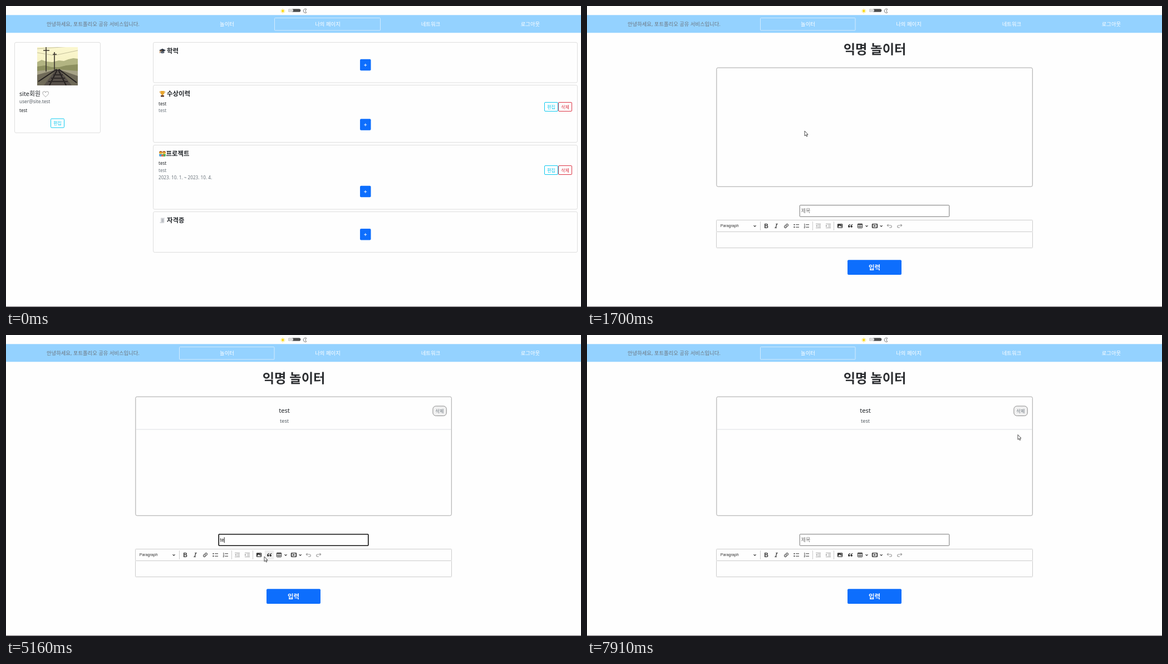
These frames come from a looping animation (1033x542 px, 8 s). An HTML page:

```html
<!DOCTYPE html>
<html lang="ko">
<head>
<meta charset="utf-8">
<title>Portfolio board</title>
<style>
html, body { margin: 0; width: 100%; height: 100%; overflow: hidden; background: #fefefe; }
svg { display: block; }
#stage { width: 100vw; height: 100vh; }
text { font-family: "Noto Sans", "Noto Sans CJK KR", sans-serif; white-space: pre; }
.ui { font-family: "Liberation Sans", Arial, sans-serif; }
</style>
</head>
<body>
<svg id="stage" viewBox="0 0 1033 542"></svg>
<script>
const INK = '#212529', GRAY = '#6c757d', BLUE = '#0d6efd', CYAN = '#0dcaf0', RED = '#dc3545';
const LOOP = 8000;
const stage = document.getElementById('stage');

// ---- markup helpers
const text = (x, y, size, str, fill = INK, extra = '') =>
  `<text x="${x}" y="${y}" font-size="${size}" fill="${fill}" ${extra}>${str}</text>`;
const mid = (x, y, size, str, fill, extra = '') =>
  text(x, y, size, str, fill, 'text-anchor="middle" ' + extra);
const box = (x, y, x2, y2, fill, stroke = 'none', rx = 0, extra = '') =>
  `<rect x="${x}" y="${y}" width="${x2 - x}" height="${y2 - y}" rx="${rx}" fill="${fill}" stroke="${stroke}" ${extra}/>`;
const path = (d, fill = 'none', stroke = 'none', w = 1) =>
  `<path d="${d}" fill="${fill}" stroke="${stroke}" stroke-width="${w}"/>`;
const dot = (x, y, r, fill) => `<circle cx="${x}" cy="${y}" r="${r}" fill="${fill}"/>`;
const at = (x, y, body, extra = '') => `<g transform="translate(${x} ${y})" ${extra}>${body}</g>`;
const group = (id, body) => `<g id="${id}">${body}</g>`;
const BOLD = 'font-weight="700"';

// ---- header
const header = () => {
  let rays = '';
  for (let a = 0; a < 360; a += 45)
    rays += `<path d="M0 -3v-1.3" stroke="#f3d33c" stroke-width=".9" transform="rotate(${a})"/>`;
  const links = [['놀이터', 397], ['나의 페이지', 578], ['네트워크', 763], ['로그아웃', 942]];
  return at(497.3, 9, rays + dot(0, 0, 2.4, '#fbdc1c')) +
    box(507, 5.2, 529.3, 10.8, '#4c4c4c', 'none', 2.8) +
    box(507, 5, 516, 11, '#dcdcdc', 'none', 3) +
    path('M539.8 5.6a3.7 3.7 0 1 0 0 6.4a3.9 3.9 0 0 1 0 -6.4z', '#fff', '#555', .8) +
    box(0, 16.3, 1033, 48.3, '#94d2ff') +
    text(73, 36.2, 9.34, '안녕하세요, 포트폴리오 공유 서비스입니다.', GRAY) +
    links.map(([s, x]) => mid(x, 36.2, 9.4, s, '#fff')).join('') +
    box(482.5, 21.5, 672.5, 44, 'none', '#d3ebfd', 1, 'id="tab"');
};

// ---- profile page
const smallBtn = (x, y, label, color) =>
  box(x, y, x + 24, y + 16, 'none', color, 1.5) + mid(x + 12, y + 11, 8, label, color);

const photo = () =>
  `<svg x="56" y="74" width="73" height="69">` +
  `<defs><linearGradient id="sky" x2="0" y2="1"><stop stop-color="#fbf7cf"/><stop offset="1" stop-color="#eeeab4"/></linearGradient></defs>` +
  box(0, 0, 73, 69, 'url(#sky)') +
  path('M0 27l8-4 9 3 10 1 12-3 9 1 8-3 9-2 8 1v24H0z', '#b2b482') +
  path('M0 35l14-2 12 3 14 0 12-3 21-2v20H0z', '#8d9060') +
  path('M0 43l34-3 39 3v26H0z', '#a6a286') +
  path('M0 50l32-9 9 0 32 11v17H0z', '#6f6a58') +
  path('M34 40h6L62 69H12z', '#57504a') +
  path('M35 40L2 62M39 40L71 64M36 41L22 69M38 41L52 69', 'none', '#24201f', 2) +
  path('M29 50h17M25 56h25M20 62h35', 'none', '#2f2a28', 1.8) +
  path('M16 0v44M31 9v32M11 6h11M28 13h7', 'none', '#38332c', 1.6) +
  path('M0 3L73 -2M0 10L31 15L73 6', 'none', '#8a8668', .5) +
  `</svg>`;

const icons = {
  cap: path('M-6 -1.2L0 -4.2L6 -1.2L0 2z', '#2c3440') + path('M-3.4 .8v2.4q3.4 2 6.8 0V.8L0 2.6z', '#454f5e') +
    path('M0 -1.2L-4.6 .4v3.4', 'none', '#b0702c', .9),
  cup: path('M-3 -5h6v3.4q0 3-3 3.6q-3-.6-3-3.6z', '#e9a52d') +
    path('M-3 -4h-1.7q0 3 2.2 3.4M3 -4h1.7q0 3-2.2 3.4', 'none', '#d28d1e', .9) +
    box(-.8, 1.5, .8, 3.4, '#c98419') + box(-3, 2.8, 3, 5.4, '#5d3a2a', 'none', .6),
  people: [[-3, '#4a9fdc'], [3, '#54ae57']].map(([x, c]) =>
    box(x - 2.8, 0, x + 2.8, 5, c, 'none', 1.4) + dot(x, -2, 2.8, '#f3bd3c') +
    path(`M${x - 2.8} -2a2.8 2.8 0 0 1 5.6 0q-2.8 -1.6 -5.6 0z`, '#a1562a')).join('') +
    box(-2, 1.5, 2, 5, '#e06a4a', 'none', 1),
  scroll: path('M-3 -4.5h7.4l-1 1.4v6.6q0 1.4-1.6 1.4h-5q-1.8 0-1.8-1.6h2z', '#d3d5d9') +
    path('M-1 -2h3M-1 0h3M-1 2h3', 'none', '#8d9299', .7)
};

const section = (y, y2, icon, title, mx, plus) =>
  box(264.5, y, 1026.5, y2, '#fefefe', '#dedede', 2.5) +
  at(281, y + 15.5, icons[icon]) +
  text(mx, y + 19, 11.4, title, INK, BOLD) +
  box(636, plus, 655.5, plus + 20.4, BLUE, 'none', 2) +
  path(`M643.2 ${plus + 10.6}h5M645.7 ${plus + 8.1}v5`, 'none', '#fff', .9);

const profile = () =>
  box(15.5, 65.5, 169.5, 228.3, '#fefefe', '#dedede', 2.5) + photo() +
  text(24, 162, 10.8, 'site회원') +
  path('M71.2 163.6C67 160 66 158.3 66 156.8a2.6 2.6 0 0 1 5.2 -.7a2.6 2.6 0 0 1 5.2 .7C76.400 158.300 75.400 160 71.200 163.600z', '#fff', '#8c8c8c', .8) +
  text(24, 175, 8.3, 'user@site.test', '#565d64') + text(24, 190.8, 8.1, 'test') +
  smallBtn(80.5, 203, '편집', CYAN) +
  section(65.5, 138, 'cap', '학력', 289, 95.8) +
  section(142.5, 245.5, 'cup', '수상이력', 289, 203.3) +
  section(250.5, 366, 'people', '프로젝트', 287.5, 323.8) +
  section(370.5, 443.5, 'scroll', '자격증', 289, 401) +
  [178.6, 286.2].map(y => text(274, y, 8.1, 'test') + text(274, y + 12.8, 8.1, 'test', GRAY)).join('') +
  text(274, 311.8, 8.2, '2023. 10. 1. ~ 2023. 10. 4.', GRAY) +
  [173.5, 287.5].map(y => smallBtn(967.5, y, '편집', CYAN) + smallBtn(992.5, y, '삭제', RED)).join('');

// ---- board page
const chevron = x => path(`M${x - 2} 395.200l2 2 2 -2`, 'none', '#333', 1.1);
const line = (x, x2, ...ys) => ys.map(y => `M${x} ${y}H${x2}`).join('');
const quote = 'M0 -3.2c-2.700 .5-4 2-4 4.300a1.800 1.800 0 1 0 1.800-1.800c0-.8.7-1.400 2.200-1.400z';
const turn = 'M-4 -1H1.8a2 2 0 0 1 0 4H-.5M-2 -3.200L-4.200 -1L-2 1.200';
const indent = line(-4.5, 4.5, -3.5, 3.5) + line(-.3, 4.5, -1.2, 1.2);

const tools = [
  [322, '<text class="ui" x="-3.7" y="3.7" font-size="10.500" font-weight="700" fill="#333">B</text>'],
  [340, path('M-.8 -3.500h3.600M-2.800 3.500h3.600M1 -3.500L-1 3.500', 'none', '#333', 1.2)],
  [358, `<g transform="rotate(-45)">${path('M0 -1.900h-2.200a1.900 1.900 0 0 0 0 3.800h1.700M0 1.900h2.200a1.900 1.900 0 0 0 0 -3.800h-1.700M-1.600 0h3.200', 'none', '#333', 1)}</g>`],
  [376, dot(-3.6, -2.2, 1.1, '#333') + dot(-3.6, 2.2, 1.1, '#333') + path(line(-.8, 5, -2.2, 2.2), 'none', '#333', 1.1)],
  [394, text(-4.6, -.4, 4.6, '1', '#333', BOLD) + text(-4.6, 4.4, 4.6, '2', '#333', BOLD) + path(line(-.8, 5, -2.2, 2.2), 'none', '#333', 1.1)],
  [415.5, path(indent, 'none', '#999', .9) + path('M-1.700 -1.800v3.600L-4.500 0z', '#999')],
  [433.5, path(indent, 'none', '#999', .9) + path('M-4.500 -1.800v3.600L-1.700 0z', '#999')],
  [454.5, box(-4.6, -3.7, 4.6, 3.7, '#333', 'none', 1) + path('M-3.500 2.400L-1 -1l2 2 1-1 1.800 2.400z', '#fff') + dot(2.4, -1.6, .8, '#fff')],
  [473, path(quote, '#333') + at(4.4, 0, path(quote, '#333'))],
  [490.5, box(-4.2, -3.7, 4.2, 3.7, 'none', '#333', .8) + path('M-4 -2.800h8', 'none', '#333', 1.6) + path('M-4 .9h8M-1.400 -2v6M1.400 -2v6', 'none', '#333', .8)],
  [517, box(-4.6, -3.4, 4.6, 3.4, 'none', '#333', .8, 'stroke-width="1.200"') + path('M-1.400 -2v4L2 0z', '#333') + path('M-3.200 -3v6M3.200 -3v6', 'none', '#333', .7)],
  [543.5, `<g id="undo">${path(turn, 'none', 'currentColor', 1.1)}</g>`],
  [561.5, `<g transform="scale(-1 1)">${path(turn, 'none', '#999', 1.1)}</g>`]
];

const post = i => at(0, i * 53.5,
  mid(500, 140, 11.2, '', INK, `id="pt${i}"`) +
  mid(500, 157.6, 9.1, '', '#545b62', `id="pb${i}"`) +
  box(766.9, 128, 791.3, 145.5, '#f1f1f1', '#8b8b8b', 5.5, `id="del${i}"`) +
  mid(779, 139.8, 8.1, '삭제', GRAY) +
  path('M233 170H800', 'none', '#dcdfe2'), `id="post${i}"`);

const board = () =>
  mid(517, 86.3, 23.2, '익명 놀이터', '#2b2d30', BOLD) +
  box(232.8, 111.2, 800.3, 325.2, '#fefefe', '#a6a6a6', 2.5) +
  post(0) + post(1) +
  box(382.2, 358.7, 650.8, 379.3, '#fff', '#767676', 1, 'id="input"') +
  text(384.5, 372.3, 9.2, '제목', '#757575', 'id="hint"') +
  text(384.2, 372.2, 8.1, '', '#111', 'id="title"') +
  box(232.5, 385.5, 800.5, 406.5, '#fefefe', '#cbcbcb', 1) +
  box(232.5, 406.5, 800.5, 435.5, '#fefefe', '#cbcbcb', 1, 'id="editor"') +
  text(239.7, 398.2, 7.06, 'Paragraph', '#333', 'class="ui"') + chevron(301.5) +
  path('M311.500 388v16M405.500 388v16M443.500 388v16', 'none', '#ccc') +
  box(0, 387.7, 16.4, 404.2, '#efefef', 'none', 1, 'id="hover"') +
  tools.map(([x, body]) => at(x, 396, body)).join('') + chevron(502.5) + chevron(528.7) +
  text(238, 424.3, 8.1, '', '#333', 'id="body"') +
  box(0, 0, .9, 10, '#000', 'none', 0, 'id="caret"') +
  box(468, 457.2, 565, 484, BLUE, 'none', 2, 'id="send"') +
  mid(516.5, 474.6, 11.4, '입력', '#fff', BOLD);

const cursors = {
  arrow: path('M0 0V8.800L2 7L3.400 10L4.900 9.300L3.500 6.400H6z', '#fff', '#222', .8),
  hand: path('M-.9 5.500V.9a.9 .9 0 0 1 1.800 0V4l3.500 .8q1 .4 .8 1.600L4.600 9.500L3.800 12H-.4L-3.200 8.200q-.8-1.300 .3-1.600q1 0 2 1.400z', '#fff', '#222', .8),
  beam: path('M-1.800 -4.500q1.800 0 1.800 1v7q0 1-1.800 1M1.800 -4.500q-1.800 0-1.800 1M0 3.500q0 1 1.800 1', 'none', '#222', .8)
};

stage.innerHTML =
  group('site', header() + group('profile', profile()) + group('board', board())) +
  group('loading', text(0, 10, 8.1, 'loading...')) +
  group('status', path('M0 530H341.500q1.700 0 1.700 1.700V541.500H0z', '#58b8c1') +
    text(2.5, 538.3, 6.65, 'picsum.photos의 응답을 기다리는 중...', '#1f3437')) +
  box(0, 541, 1033, 542, '#6f6b70') +
  Object.keys(cursors).map(k => group(k, cursors[k])).join('');

// ---- timeline
// start, end, step count of each burst of changes
const bursts = [[300, 1000, 8], [1200, 2000, 9], [2100, 2890, 9], [2990, 3590, 7], [3790, 4570, 9],
  [4670, 5450, 9], [5550, 6330, 9], [6530, 7330, 9], [7430, 7910, 6]];

// time, x, y of the pointer
const trail = [[300, 574, 30], [600, 490, 11], [900, 391, 36], [1000, 389, 37], [1400, 389, 37],
  [1700, 391, 225], [2000, 430, 367], [2100, 432, 369], [2300, 453, 404], [2790, 453, 404],
  [2990, 440, 420], [3400, 440, 420], [3590, 521, 467.5], [4080, 521, 467.5], [4570, 462, 367],
  [4670, 463, 368], [4870, 464, 399], [5350, 464, 399], [5550, 452, 420], [6100, 452, 420],
  [6330, 523, 466], [6730, 523, 466], [7330, 779, 137], [7620, 779, 137], [7910, 774, 179.5]];

const snap = t => {
  let s = 0;
  for (const [a, b, n] of bursts) {
    if (t < a) break;
    const d = (b - a) / (n - 1);
    s = Math.min(b, a + Math.floor((t - a) / d + 1e-6) * d);
  }
  return s;
};
const pointer = t => {
  const i = trail.findIndex(k => k[0] > t);
  if (i < 0) return trail[trail.length - 1].slice(1);
  const [t0, x0, y0] = trail[Math.max(0, i - 1)], [t1, x1, y1] = trail[i];
  const p = t1 > t0 ? (t - t0) / (t1 - t0) : 0;
  return [x0 + (x1 - x0) * p, y0 + (y1 - y0) * p];
};
const typed = (word, start, step, t) => word.slice(0, Math.max(0, Math.floor((t - start) / step) + 1));
const within = (t, a, b) => t >= a && t < b;

const el = {};
stage.querySelectorAll('[id]').forEach(n => { el[n.id] = n; });
const show = (id, on) => { el[id].style.display = on ? '' : 'none'; };
const set = (id, attrs) => { for (const k in attrs) el[id].setAttribute(k, attrs[k]); };
const say = (id, s) => { if (el[id].textContent !== s) el[id].textContent = s; };

function draw(now) {
  const t = snap(now);
  const [x, y] = pointer(t);
  const loading = within(t, 1200, 1400), onBoard = t >= 1400;
  show('site', !loading);
  show('loading', loading);
  show('profile', !onBoard);
  show('board', onBoard);
  show('status', within(t, 300, 1400));
  set('tab', onBoard ? { x: 311.5, width: 170.5 } : { x: 482.5, width: 190 });

  // form
  let title = '', body = '';
  if (t < 3970) {
    title = typed('test', 2300, 130, t);
    body = typed('test', 3080, 95, t);
  } else if (t < 6730) {
    title = typed('testt', 5060, 95, t);
    body = typed('teste', 5640, 95, t);
  }
  const inTitle = within(t, 2100, 2990) || within(t, 4670, 5550);
  const inBody = within(t, 2990, 3790) || within(t, 5550, 6630);
  say('title', title);
  say('body', body);
  show('hint', !title);
  set('input', { stroke: inTitle ? '#101010' : '#767676', 'stroke-width': inTitle ? 1.6 : 1 });
  set('editor', { stroke: inBody ? '#2977ff' : '#cbcbcb' });
  set('undo', { color: body ? '#333' : '#999' });
  show('caret', onBoard && (inTitle || inBody));
  if (onBoard && (inTitle || inBody)) {
    const id = inTitle ? 'title' : 'body', field = el[id];
    const w = field.textContent ? field.getComputedTextLength() : 0;
    set('caret', { x: +field.getAttribute('x') + w, y: +field.getAttribute('y') - 8 });
  }

  // posts, newest first
  const posts = [];
  if (within(t, 6730, 7620)) posts.push(['testt', 'teste']);
  if (t >= 3970) posts.push(['test', 'test']);
  for (const i of [0, 1]) {
    show('post' + i, posts[i]);
    if (posts[i]) { say('pt' + i, posts[i][0]); say('pb' + i, posts[i][1]); }
  }

  // pointer and hover
  const over = (a, b, c, d) => x >= a && x <= c && y >= b && y <= d;
  const onSend = onBoard && over(468, 457, 565, 484);
  const onDel = posts.length > 0 && over(767, 128, 791, 145);
  const onText = onBoard && (over(382, 359, 651, 379) || over(233, 407, 800, 435));
  const onLink = !loading && over(311, 17, 1033, 48);
  const tool = onBoard && y > 387 && y < 405 && tools.find(k => x >= k[0] - 9.2 && x < k[0] + 8.8);
  set('send', { fill: onSend ? '#0b5ed7' : BLUE });
  set('del0', { fill: onDel ? '#e3e3e3' : '#f1f1f1' });
  show('hover', tool);
  if (tool) set('hover', { x: tool[0] - 8.2 });
  const kind = onSend || onDel || onLink ? 'hand' : onText ? 'beam' : 'arrow';
  for (const k in cursors) show(k, t >= 300 && k === kind);
  set(kind, { transform: `translate(${x} ${y})` });
}

const begin = performance.now();
function tick() {
  draw((performance.now() - begin) % LOOP);
  requestAnimationFrame(tick);
}
tick();
</script>
</body>
</html>
```
